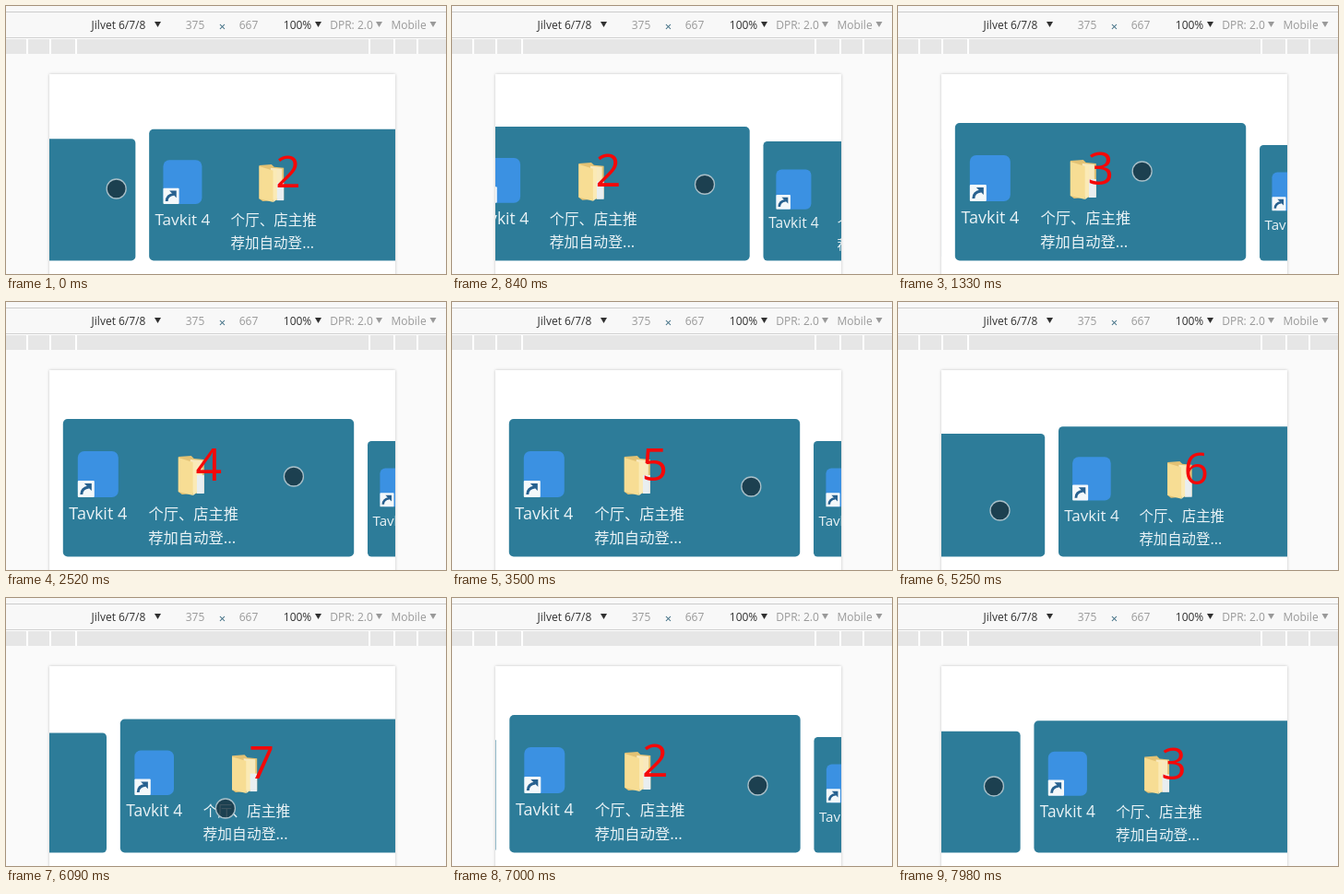
An HTML page with a canvas for the animation above (8000 ms loop, 477 by 291 pixels).

```html
<!DOCTYPE html>
<html lang="zh">
<head>
<meta charset="utf-8">
<title>Card carousel</title>
<style>
  html, body { margin: 0; width: 477px; height: 291px; overflow: hidden; background: #fafafa; }
  canvas { display: block; }
</style>
</head>
<body>
<canvas id="stage" width="477" height="291"></canvas>
<script>
const ctx = document.getElementById('stage').getContext('2d');
const LOOP = 8000, STEP = 70, SETTLE = 300, RETURN = 560;
const LATIN = '"Open Sans", "Noto Sans", sans-serif';
const HAN = '"Noto Sans CJK SC", "Noto Sans CJK", sans-serif';

const VIEW = { left: 47, right: 422, top: 74 };
const CARD = { x: 61.8, w: 315.4, h: 149.4, bottom: 276.4, gap: 14.8, small: 0.839, count: 7 };
const PITCH = CARD.w + CARD.gap;
const SMALL_PITCH = CARD.w * CARD.small + CARD.gap;

// A drag from x0 to x1, ending at height y; dir 1 shows the next card, -1 the one before.
const swipe = (press, release, y, { x0 = 328, x1 = 110, dir = 1 } = {}) =>
  ({ press, release, y, x0, x1, dir });

const swipes = [
  swipe(-500, 70, 198, { x0: 356, x1: 86 }),
  swipe(770, 1050, 179),
  swipe(1750, 2100, 189),
  swipe(2730, 3010, 200),
  swipe(3640, 3920, 223),
  swipe(4480, 4740, 223, { x0: 149, x1: 328, dir: -1 }),
  swipe(5110, 5250, 226),
  swipe(5880, 6020, 228, { x1: 168 }),
  swipe(6265, 6400, 215, { x1: 180 }),
  swipe(6580, 6750, 203),
  swipe(7080, 8000, 204, { x0: 348, x1: 98 })
];
let card = 1;
swipes.forEach((s, i) => {
  s.from = card;
  card += s.dir;
  s.y0 = i ? swipes[i - 1].y : s.y;
  s.next = swipes[i + 1] || swipes[0];
  s.free = i + 1 < swipes.length ? s.next.press - s.release : RETURN;
});

const lerp = (a, b, u) => a + (b - a) * u;
const clamp = u => Math.max(0, Math.min(1, u));
const easeOut = u => 1 - (1 - u) ** 3;
const easeSine = u => Math.sin(u * Math.PI / 2);

const swipeAt = t => swipes.filter(s => s.press <= t).pop();
const dragPart = (s, t) => clamp((t - s.press) / (s.release - s.press));
const after = (s, t, span) => clamp((t - s.release) / Math.min(span, s.free));

// The pointer follows the drag, then goes back to where the next one begins.
function pointerAt(t) {
  const s = swipeAt(t), u = dragPart(s, t);
  const x = lerp(s.x0, s.x1, u);
  return [lerp(x, s.next.x0, easeSine(after(s, t, RETURN))), lerp(s.y0, s.y, u)];
}

// Cards stick to the pointer while it drags, then settle.
function positionAt(t) {
  const s = swipeAt(t);
  const drag = s.from + (s.x0 - s.x1) * dragPart(s, t) / PITCH;
  return lerp(drag, s.from + s.dir, easeOut(after(s, t, SETTLE)));
}

function scaleOf(rel) {
  return lerp(1, CARD.small, clamp(Math.abs(rel)));
}

function leftEdge(rel) {
  if (rel >= 1) return CARD.x + PITCH + (rel - 1) * SMALL_PITCH;
  if (rel >= 0) return CARD.x + PITCH * rel;
  return leftEdge(rel + 1) - CARD.gap - CARD.w * scaleOf(rel);
}

function rect(x, y, w, h, color) {
  ctx.fillStyle = color;
  ctx.fillRect(x, y, w, h);
}

function round(x, y, w, h, r, color) {
  ctx.fillStyle = color;
  ctx.beginPath();
  ctx.roundRect(x, y, w, h, r);
  ctx.fill();
}

function poly(color, ...pts) {
  ctx.fillStyle = color;
  ctx.beginPath();
  for (let i = 0; i < pts.length; i += 2) ctx.lineTo(pts[i], pts[i + 1]);
  ctx.fill();
}

function label(str, x, y, size, color, family = LATIN) {
  ctx.font = `${size}px ${family}`;
  ctx.textAlign = 'center';
  ctx.fillStyle = color;
  ctx.fillText(str, x, y);
}

function arrow(x, color) {
  poly(color, x - 3.5, 17, x + 3.5, 17, x, 23);
}

function drawToolbar() {
  rect(0, 0, 477, 291, '#fafafa');
  rect(0, 0, 477, 35, '#f8f8f8');
  rect(0, 6, 477, 1, '#ccc');
  rect(0, 34, 477, 1, '#d0d0d0');
  rect(0, 35, 477, 17, '#fff');
  rect(0, 36, 477, 16, '#e6e6e6');
  for (const x of [22, 47, 75, 393, 420, 445]) rect(x, 36, 2, 16, '#fff');

  const dark = '#303030', grey = '#999';
  label('Jilvet 6/7/8', 122, 25, 12, dark);
  label('375', 205, 25, 12, grey);
  label('×', 234.5, 27, 13, '#3a6a80');
  label('667', 263, 25, 12, grey);
  label('100%', 316, 25, 12, dark);
  label('DPR: 2.0', 374.5, 25, 12, grey);
  label('Mobile', 436.5, 25, 12, grey);
  arrow(164.5, dark);
  arrow(338.5, dark);
  arrow(404.5, grey);
  arrow(463, grey);
}

function drawPage() {
  ctx.save();
  ctx.shadowColor = 'rgba(0,0,0,.22)';
  ctx.shadowBlur = 3;
  rect(VIEW.left, VIEW.top, VIEW.right - VIEW.left, 240, '#fff');
  ctx.restore();
}

function drawFolder() {
  poly('#e3c274', 125, 41, 139, 40, 142, 43, 153, 44, 153, 80, 129, 82, 125, 79);
  poly('#f8e9bd', 138, 44, 151, 45, 151, 78, 138, 80);
  poly('#e9eef0', 145, 61, 153, 61, 153, 81, 145, 81);
  poly('#f7dd94', 125, 42, 141, 47, 141, 83, 125, 79);
  poly('#fbeab5', 141, 47, 145, 46, 145, 80, 141, 83);
}

function drawShortcut() {
  round(16, 67, 18, 18, 1, '#f4f8fa');
  ctx.strokeStyle = '#28618f';
  ctx.lineWidth = 3;
  ctx.beginPath();
  ctx.moveTo(20, 82);
  ctx.quadraticCurveTo(20, 75, 28, 74);
  ctx.stroke();
  poly('#28618f', 23, 70, 31, 70, 31, 78);
}

function drawCard(k, rel) {
  const s = scaleOf(rel), pale = '#eaf3f6';
  ctx.save();
  ctx.translate(leftEdge(rel), CARD.bottom - CARD.h * s);
  ctx.scale(s, s);
  round(0, 0, CARD.w, CARD.h, 5, '#2d7c99');
  round(16, 35, 44, 50, 7, '#3b91e2');
  drawShortcut();
  drawFolder();
  label('Tavkit 4', 38, 109, 18, pale);
  label('个厅、店主推', 141.5, 109, 16.3, pale, HAN);
  label('荐加自动登...', 140, 135, 16.3, pale, HAN);
  label((k - 1) % CARD.count + 1, 158, 66.5, 50, '#f50808');
  ctx.restore();
}

function drawPointer([x, y]) {
  ctx.beginPath();
  ctx.arc(x + 0.5, y + 0.5, 10.5, 0, Math.PI * 2);
  ctx.fillStyle = 'rgba(25,52,65,.84)';
  ctx.fill();
  ctx.strokeStyle = '#a9bfc8';
  ctx.lineWidth = 1.3;
  ctx.stroke();
}

function draw(t) {
  drawToolbar();
  drawPage();
  const pos = positionAt(t), mid = Math.floor(pos);
  ctx.save();
  ctx.beginPath();
  ctx.rect(VIEW.left, VIEW.top, VIEW.right - VIEW.left, 291 - VIEW.top);
  ctx.clip();
  for (let k = mid - 1; k <= mid + 2; k++) drawCard(k + CARD.count, k - pos);
  ctx.restore();
  drawPointer(pointerAt(t));
}

const start = performance.now();
function tick() {
  const t = (performance.now() - start) % LOOP;
  draw(Math.floor(t / STEP) * STEP);
  requestAnimationFrame(tick);
}
tick();
</script>
</body>
</html>
```
